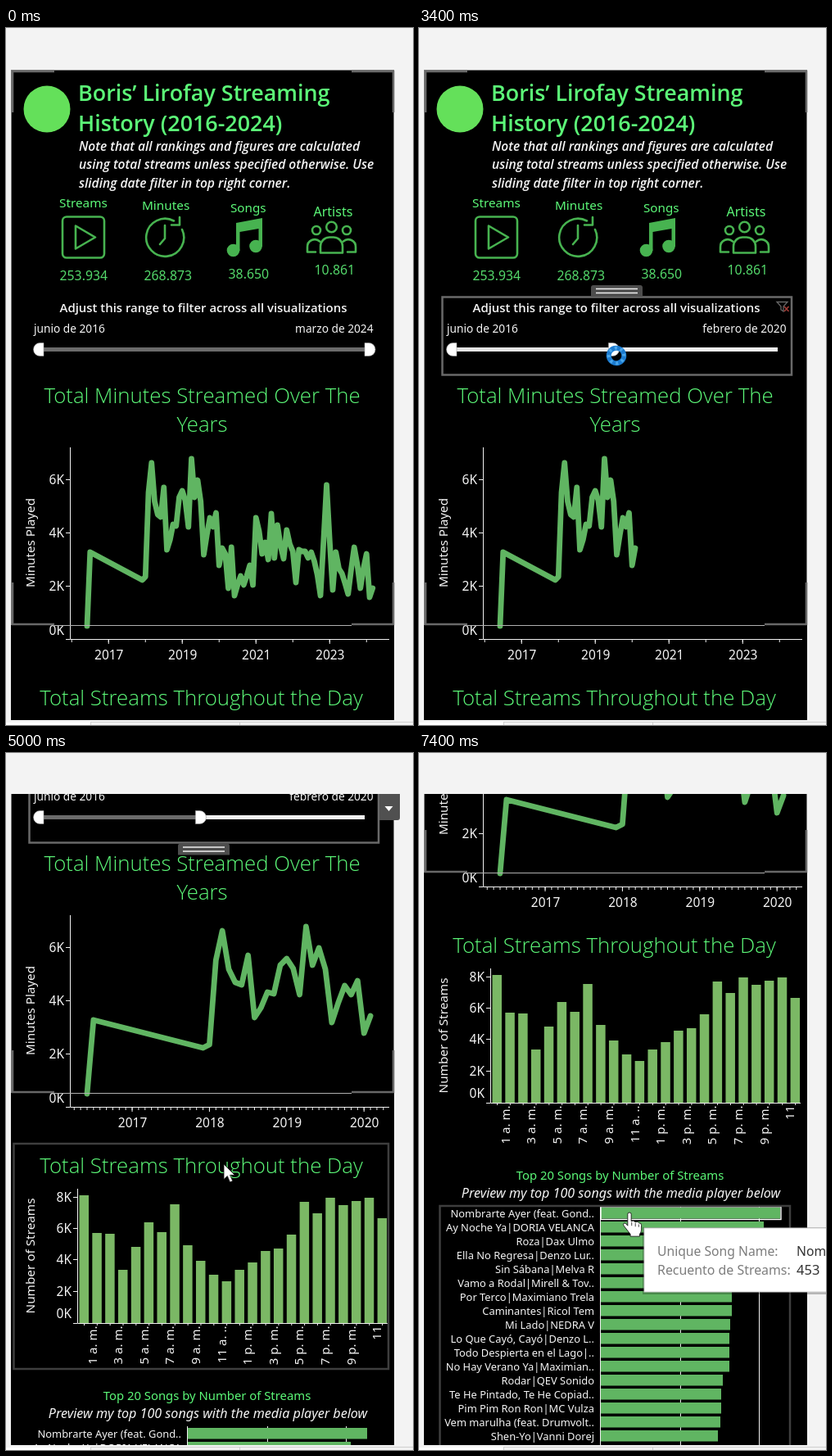
Write an HTML page that moves like this. It is 497 by 851 pixels and loops after 8000 ms.

```html
<!DOCTYPE html>
<html lang="en">
<head>
<meta charset="utf-8">
<title>Streaming dashboard</title>
<style>
  html, body { margin: 0; width: 100%; height: 100%; overflow: hidden; background: #f3f3f3; }
  svg { display: block; width: 100%; height: 100%; }
  text { font-family: "Noto Sans", "Open Sans", sans-serif; fill: #f4f4f4; white-space: pre; }
  .semi { font-family: "Open Sans", "Noto Sans", sans-serif; font-weight: 600; }
  .light { font-family: "Open Sans", "Noto Sans", sans-serif; font-weight: 300; }
  .italic { font-style: italic; }
  .green { fill: #5cf878; }
  .value { fill: #54d96b; }
  .gray { fill: #7d7d7d; }
  .dark { fill: #333; }
  .icon { fill: none; stroke: #47b350; stroke-width: 2.6; stroke-linecap: round; stroke-linejoin: round; }
  .axis { fill: none; stroke: #f0f0f0; stroke-width: 1; }
  .zone { fill: none; stroke: #3e3e3e; stroke-width: 2.5; }
  .zone.selected { stroke: #696969; }
</style>
</head>
<body>
<svg id="stage" viewBox="0 0 497 851" preserveAspectRatio="none"></svg>
<script>
const LOOP = 8000;
const LAST_MONTH = 93, PICKED_MONTH = 44;
const DATA_READY = 3900;
const MONTHS = ['enero', 'febrero', 'marzo', 'abril', 'mayo', 'junio', 'julio',
  'agosto', 'septiembre', 'octubre', 'noviembre', 'diciembre'];

// Line heights by month; the series has a gap between months 1 and 18.
const EARLY = [730, 640];
const LATER = [674, 670, 567, 531, 578, 594, 597, 561, 637, 625, 606, 608, 573, 565, 577,
  609, 526, 573, 552, 578, 643, 619, 598, 609, 592, 656, 635, 642, 684, 634, 693, 680, 669,
  680, 669, 656, 680, 598, 614, 642, 628, 649, 593, 647, 607, 632, 648, 613, 630, 639, 677,
  637, 639, 639, 647, 640, 651, 668, 693, 627, 558, 626, 686, 640, 660, 666, 678, 691, 661,
  634, 655, 684, 660, 642, 695, 684];
const SERIES = [...EARLY.map((y, i) => [i, y]), ...LATER.map((y, i) => [i + 18, y])];

const HOURS = [156, 110, 109, 65, 93, 123, 111, 145, 95, 76, 59, 51,
  65, 74, 88, 91, 108, 148, 134, 153, 144, 149, 153, 128];

const SONGS = [
  ['Nombrarte Ayer (feat. Gond..', 441], ['Ay Noche Ya|DORIA VELANCA', 421],
  ['Roza|Dax Ulmo', 416], ['Ella No Regresa|Denzo Lur..', 392],
  ['Sin Sábana|Melva R', 391], ['Vamo a Rodal|Mirell & Tov..', 383],
  ['Por Terco|Maximiano Trela', 382], ['Caminantes|Ricol Tem', 382],
  ['Mi Lado|NEDRA V', 380], ['Lo Que Cayó, Cayó|Denzo L..', 379],
  ['Todo Despierta en el Lago|..', 379], ['No Hay Verano Ya|Maximian..', 379],
  ['Rodar|QEV Sonido', 371], ['Te He Pintado, Te He Copiad..', 369],
  ['Pim Pim Ron Ron|MC Vulza', 369], ['Vem marulha (feat. Drumvolt..', 368],
  ['Shen-Yo|Vanni Dorej', 365]];

const range = (n, fn) => Array.from({ length: n }, (_, i) => fn(i)).join('');
const escape = s => s.replace(/&/g, '&amp;');
const text = (x, y, size, s, cls = '', anchor = 'start', extra = '') =>
  `<text x="${x}" y="${y}" font-size="${size}" class="${cls}" text-anchor="${anchor}" ${extra}>${escape(s)}</text>`;
const upright = (x, y, size, s, anchor) =>
  text(0, 0, size, s, '', anchor, `transform="translate(${x} ${y}) rotate(-90)"`);
const rect = (x, y, w, h, fill, extra = '') =>
  `<rect x="${x}" y="${y}" width="${w}" height="${h}" fill="${fill}" ${extra}/>`;
const zone = (id, x, y, w, h) => rect(x, y, w, h, 'none', `id="${id}" class="zone"`);

const header = () => `
  <circle cx="50" cy="99" r="28.5" fill="#64e05a"/>
  ${text(88, 89, 26.9, 'Boris’ Lirofay Streaming', 'semi green')}
  ${text(88, 126, 26.9, 'History (2016-2024)', 'semi green')}
  ${['Note that all rankings and figures are calculated',
    'using total streams unless specified otherwise. Use',
    'sliding date filter in top right corner.']
    .map((s, i) => text(89, 150 + i * 22.3, 15.6, s, 'semi italic')).join('')}
  ${text(65, 219, 15.3, 'Streams', 'green')}${text(166, 222, 15.3, 'Minutes', 'green')}
  ${text(274, 225, 15.2, 'Songs', 'green')}${text(375.5, 230, 16, 'Artists', 'green')}
  <g class="icon">
    <rect x="69" y="230.5" width="51" height="50" rx="5"/>
    <path d="M85 241.5L109 255.5L85 269.5z"/>
    <path d="M205 235.5A23 23 0 1 0 215 246M194 241v16l-6 7M212 231v9.500h-10"/>
    <circle cx="397.500" cy="243" r="6.300"/><circle cx="379" cy="247" r="5"/><circle cx="416" cy="247" r="5"/>
    <path d="M384 274.500v-8a11 11 0 0 1 11-11h5a11 11 0 0 1 11 11v8zM378 273.500h-10v-6a9 9 0 0 1 15-7M417 273.500h10v-6a9 9 0 0 0-15-7"/>
  </g>
  <g fill="#47b350"><circle cx="277.500" cy="271.500" r="7.800"/><circle cx="305" cy="266.500" r="7.800"/>
    <path d="M281 238L313 232V267H308.500V245L285.500 249V272H281z"/></g>
  ${[124, 227, 321, 426].map((x, i) =>
    text(x, [308, 308, 306, 301][i], 15.8, '', 'value total', 'end')).join('')}`;

const slider = () => `
  ${text(241, 347, 14.93, 'Adjust this range to filter across all visualizations', 'semi', 'middle')}
  ${text(34, 372, 13.7, 'junio de 2016')}${text(448.500, 372, 13.7, '', '', 'end', 'id="until"')}
  ${rect(46, 390, 392, 5, '#f0f0f0')}${rect(46, 390, 392, 5, '#6b6b6b', 'id="track"')}
  <g fill="#fff" stroke="#999" stroke-width=".6">
    <path d="M46 384.500h-4.500a8 8 0 0 0 0 16h4.500z"/>
    <path id="handle" d="M0 384.500h5a8 8 0 0 1 0 16h-5z"/></g>
  ${zone('filterZone', 28.5, 328.5, 426.5, 95)}
  <g id="funnel" fill="none" stroke="#666" stroke-width="1.300">
    <path d="M437 334.500h13l-5 5.500v6l-3-2v-4z"/><path d="M446 340l5.500 6m0-6l-5.500 6" stroke="#a33c36" stroke-width="1.600"/></g>`;

const lineChart = () => `
  ${text(239.5, 458, 25.8, 'Total Minutes Streamed Over The', 'light green', 'middle')}
  ${text(239.5, 493, 25.8, 'Years', 'light green', 'middle')}
  ${upright(35, 628.5, 15.2, 'Minutes Played', 'middle')}
  ${['6K', '4K', '2K', '0K'].map((s, i) =>
    text(71, [556.5, 621.5, 686.5, 740.5][i], 15.5, s, '', 'end')).join('')}
  <path class="axis" d="M78.500 512V746.500H468M73 551.500h5M73 616.500h5M73 681.500h5M73 746.500h5"/>
  <g id="years"></g>
  <path id="line" fill="none" stroke="#60b562" stroke-width="6.800" stroke-linecap="round" stroke-linejoin="round"/>
  ${zone('lineZone', 9.5, 422.5, 460, 362.5)}`;

const dayChart = () => `
  ${text(238.5, 827, 25.8, 'Total Streams Throughout the Day', 'light green', 'middle')}
  ${upright(35, 928, 15.3, 'Number of Streams', 'middle')}
  ${['8K', '6K', '4K', '2K', '0K'].map((s, i) =>
    text(80, [861.5, 899.5, 937.5, 976.5, 1003.5][i], 15.5, s, '', 'end')).join('')}
  ${HOURS.map((h, i) => rect(89.5 + i * 15.83, 1010 - h, 11.5, h, '#7bb865')).join('')}
  <path class="axis" d="M87.500 846V1010.500H466${[856, 894, 932, 971, 1010].map(y => `M82 ${y}.5h5`).join('')}${
    range(24, i => `M${95.5 + i * 15.83} 1010v3`)}"/>
  ${range(12, i => {
    const hour = i % 6 * 2 + 1, half = i < 6 ? 'a' : 'p';
    const label = hour < 11 ? `${hour} ${half}. m.` : half === 'a' ? '11 a. ..' : '11';
    return upright(110.5 + i * 31.6, 1013.5, 15, label, 'end');
  })}
  ${zone('dayZone', 9.5, 791, 457.5, 275)}`;

const songChart = () => `
  ${text(245.5, 1104, 14.85, 'Top 20 Songs by Number of Streams', 'green', 'middle')}
  ${text(246.5, 1126, 16.1, 'Preview my top 100 songs with the media player below', 'italic', 'middle')}
  <path class="axis" d="M221.500 1136V1440M319.500 1136V1440M415.500 1136V1440"/>
  ${SONGS.map(([name, end], i) => rect(222, 1138 + i * 17, end - 222, 13.5, '#60b562')
    + text(214, 1149.7 + i * 17, 12.9, name, '', 'end')).join('')}
  <rect id="picked" x="222" y="1137" width="220" height="15.500" fill="none" stroke="#fff" stroke-width="1.400"/>
  ${zone('songZone', 25.5, 1136, 427.5, 400)}`;

const frame = () => `
  <path d="M6.500 51V729M473.500 51V729M6 51.500H474" fill="none" stroke="#7c7c7c"/>
  <path d="M59 729.500H422" stroke="#b0b0b0"/>
  <path d="M8 103V53H59M422 53H473V103M8 677V728H59M422 728H473V677" fill="none" stroke="#686868" stroke-width="2.600"/>`;

const zoneTools = () => `
  <g id="grip"><path d="M210 328v-11q0-3 3-3h57q3 0 3 3v11z" fill="#4d4d4d"/>
    <path d="M216 318.500h51M216 323.500h51" stroke="#f0f0f0" stroke-width="1.500"/></g>
  <g id="buttons"><path d="M456 328h22q3 0 3 3v46q0 3-3 3h-22z" fill="#505050"/>
    <path d="M462 335l10.500 10.500m0-10.500l-10.500 10.500" stroke="#fff" stroke-width="2"/>
    <path d="M462.500 363h10l-5 6z" fill="#fff"/></g>`;

const overlay = () => `
  <g id="tooltip">${rect(273, 579, 240, 82, '#000', 'opacity=".25"')}${rect(275, 580, 240, 78, '#fff', 'stroke="#ccc"')}
    ${text(291, 613.5, 15.7, 'Unique Song Name:', 'gray')}${text(461, 613.5, 15.7, 'Nombrarte Ayer', 'dark')}
    ${text(291, 637, 15.9, 'Recuento de Streams:', 'gray')}${text(461, 637, 16.5, '453', 'dark')}</g>
  <g id="cursor">
    <path id="arrow" d="M0 0V18.500L4.300 14.500L7.500 22L10.800 20.500L7.600 13.300H13.300z" fill="#fff" stroke="#111" stroke-width=".8"/>
    <g id="hand" transform="scale(1.080)"><path d="M-2 2q0-2 2-2t2 2v8q3-2 4.500 1q3-1.500 4.500 1q2.500-.5 2.500 2.500v5q0 3-2 5v2.500h-10.500v-2.500l-7-9q-2-3 .5-3.500q1.500 0 3.500 3z" fill="#fff" stroke="#111" stroke-width=".8"/>
      <path d="M2.500 11v4M6.700 12v4M10.500 13.500v3" stroke="#555"/></g>
    <g id="spinner" fill="none" stroke-width="6"><circle r="9.300" stroke="#1b7bd0"/>
      <circle r="9.300" stroke="#4aa6ea" stroke-width="4" stroke-dasharray="3 4.300"/></g>
  </g>`;

const stage = document.getElementById('stage');
stage.innerHTML = `
  <clipPath id="view"><rect x="0" y="50" width="497" height="795"/></clipPath>
  ${rect(0, 0, 497, 851, '#f3f3f3')}
  <g clip-path="url(#view)"><g id="page">
    ${rect(6, 51, 468, 1500, '#000')}
    ${header()}${slider()}${lineChart()}${dayChart()}${songChart()}${frame()}${zoneTools()}
  </g></g>
  ${rect(0, 845, 497, 6, '#f3f3f3')}${rect(0, 848, 103, 3, '#fff')}
  <path d="M103 847.500H497M103.500 847V851M285.500 847V851" stroke="#cfcfcf"/>
  ${overlay()}`;

const el = {};
stage.querySelectorAll('[id]').forEach(node => el[node.id] = node);
const totals = [...stage.querySelectorAll('.total')];

const set = (id, name, value) => el[id].setAttribute(name, value);
const show = (id, on) => set(id, 'visibility', on ? 'visible' : 'hidden');
const move = (id, x, y) => set(id, 'transform', `translate(${x} ${y})`);

// Linear interpolation through [time, ...values] stops.
function track(t, stops) {
  const i = stops.findIndex(stop => stop[0] > t);
  if (i === 0) return stops[0].slice(1);
  if (i < 0) return stops[stops.length - 1].slice(1);
  const [a, b] = [stops[i - 1], stops[i]];
  const p = (t - a[0]) / (b[0] - a[0]);
  return a.slice(1).map((v, k) => v + (b[k + 1] - v) * p);
}

const SCROLL = [[4230, 0], [4530, 142], [5000, 314], [5270, 328], [5640, 328], [5960, 583]];
const PICK = [[1840, LAST_MONTH], [2130, 61], [2500, PICKED_MONTH]];
const POINTER = [[70, 484, 838], [400, 462, 600], [870, 445, 394], [1000, 445, 394], [1260, 433, 387],
  [1530, 443, 394], [1840, 443, 394], [2130, 292, 390], [2500, 236, 392], [3390, 236, 392],
  [3400, 241, 400], [4190, 241, 400], [4400, 267, 502], [4800, 267, 502], [5000, 266, 502],
  [6500, 266, 502], [6850, 478, 530], [7330, 257, 561]];

const monthStep = narrowed => narrowed ? 7.865 : 3.75;

function drawYears(narrowed) {
  const xAt = m => 99 + monthStep(narrowed) * m;
  const shown = narrowed ? [2017, 2018, 2019, 2020] : [2017, 2019, 2021, 2023];
  const monthOf = year => (year - 2017) * 12 + 7;
  const ticks = narrowed
    ? range(49, i => `M${xAt(i - 2)} 747v3`)
    : range(9, i => `M${xAt(monthOf(2016 + i))} 747v3`);
  el.years.innerHTML = `<path class="axis" d="${ticks}${shown.map(y => `M${xAt(monthOf(y))} 747v5`).join('')}"/>`
    + shown.map(y => text(xAt(monthOf(y)) + .5, 771, 15.5, y + '', '', 'middle')).join('');
}

let lastNarrowed = null;
function update(t) {
  const narrowed = t >= DATA_READY;
  const [scroll] = track(t, SCROLL).map(Math.round);
  const month = Math.round(track(t, PICK)[0]);
  const [x, y] = track(t, POINTER).map(Math.round);

  move('page', 0, -scroll);

  const edge = 46 + month * 392 / LAST_MONTH;
  move('handle', edge, 0);
  set('track', 'width', edge - 46);
  set('track', 'fill', t >= 2670 && !narrowed ? '#e4e4e4' : '#6b6b6b');
  el.until.textContent = `${MONTHS[(month + 5) % 12]} de ${2016 + Math.floor((month + 5) / 12)}`;

  if (narrowed !== lastNarrowed) {
    drawYears(narrowed);
    const values = narrowed ? ['135.447', '125.519', '20.225', '7.048']
      : ['253.934', '268.873', '38.650', '10.861'];
    totals.forEach((node, i) => node.textContent = values[i]);
    lastNarrowed = narrowed;
  }
  set('line', 'd', 'M' + SERIES.filter(([m]) => m <= month)
    .map(([m, h]) => `${99 + m * monthStep(narrowed)} ${h}`).join('L'));

  const lowTools = scroll > 264;
  show('filterZone', t >= 740);
  show('funnel', t >= 740);
  el.filterZone.classList.toggle('selected', t >= 2660);
  show('grip', t >= 2500);
  move('grip', 0, lowTools ? 110.5 : 0);
  show('buttons', t > 3450);
  move('buttons', 0, lowTools ? 16 : 0);

  show('lineZone', (t >= 200 && t < 740) || (t >= 4330 && t < 4800));
  show('dayZone', t >= 4800 && t < 6600);
  show('songZone', t >= 7390);
  show('picked', t >= 7390);
  show('tooltip', t >= 7390);

  const busy = t >= 3395 && t < 4190;
  const pointing = (t >= 4400 && t < 4750) || t >= 7260;
  const present = t >= 70;
  move('cursor', x, y);
  show('spinner', present && busy);
  show('hand', present && pointing);
  show('arrow', present && !busy && !pointing);
  set('spinner', 'transform', `rotate(${t * .3})`);
}

const start = performance.now();
function tick() {
  update((performance.now() - start) % LOOP);
  requestAnimationFrame(tick);
}
update(0);
requestAnimationFrame(tick);
</script>
</body>
</html>
```
